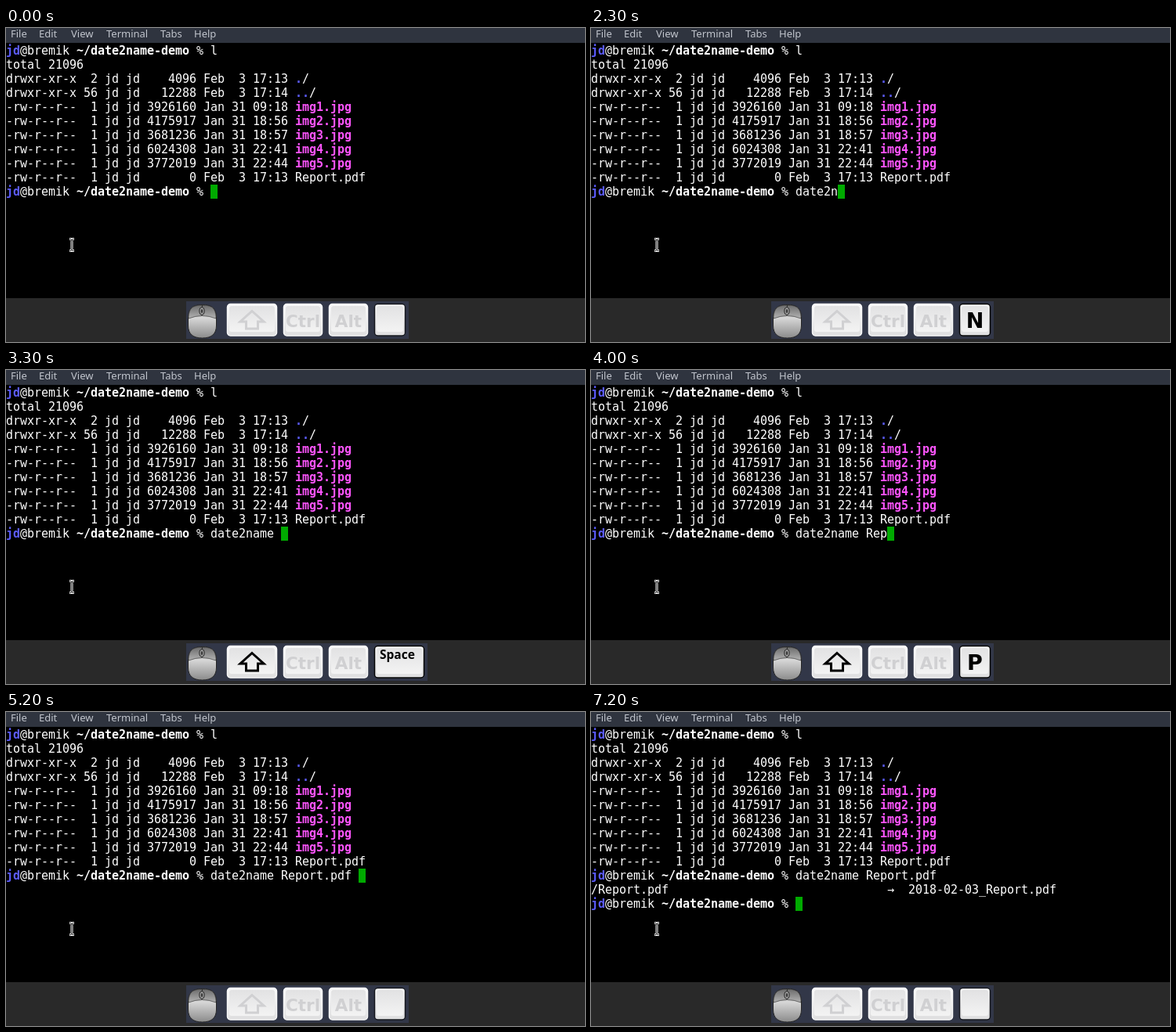
An HTML page that plays this animation: 739x401 px, repeating every 8 s.

```html
<!DOCTYPE html>
<html lang="en">
<head>
<meta charset="utf-8">
<title>Terminal demo</title>
<style>
html, body { margin: 0; width: 100%; height: 100%; overflow: hidden; background: #000; }
svg { display: block; width: 739px; height: 401px; }
text { white-space: pre; }
.term { font: 15px "DejaVu Sans Mono", monospace; letter-spacing: -.03px; fill: #fff; }
.term .b { font-weight: bold; }
.user { fill: #5c5cff; }
.img { fill: #ff55ff; }
.menu { font: 13px "Noto Sans", sans-serif; fill: #c0c4cc; }
.mod { font: bold 21.5px "DejaVu Sans", sans-serif; fill: #d0d0d2; text-anchor: middle; }
.key { font: bold 27px "DejaVu Sans", sans-serif; text-anchor: middle; }
.name { font: bold 15.5px "Noto Sans", sans-serif; }
.sign { font: 18px "DejaVu Sans", sans-serif; }
</style>
</head>
<body>
<svg id="stage" viewBox="0 0 739 401">
  <defs>
    <linearGradient id="cap" x2="0" y2="1">
      <stop offset="0" stop-color="#fbfbfb"/><stop offset="1" stop-color="#dededf"/>
    </linearGradient>
    <linearGradient id="face" x2="0" y2="1">
      <stop offset="0" stop-color="#e2e2e3"/><stop offset="1" stop-color="#f3f3f3"/>
    </linearGradient>
    <linearGradient id="body" x2="0" y2="1">
      <stop offset="0" stop-color="#b9b9b9"/><stop offset=".4" stop-color="#d6d6d6"/>
      <stop offset="1" stop-color="#8b8b8b"/>
    </linearGradient>
    <linearGradient id="buttons" x2="0" y2="1">
      <stop offset="0" stop-color="#6c6c6c"/><stop offset="1" stop-color="#b4b4b4"/>
    </linearGradient>
  </defs>
  <rect width="739" height="401"/>
  <rect width="739" height="19" fill="#2f343f"/>
  <g class="menu" id="menu"></g>
  <g class="term" id="listing"></g>
  <rect id="caret" width="9" height="18" fill="#00aa00"/>
  <g class="term" id="live"></g>
  <g fill="none">
    <path d="M81 269.500H83L84 270.500L85 269.500H87M84 270V284M81 284.500H83L84 283.500L85 284.500H87" stroke="#fff" stroke-width="3"/>
    <path d="M81.500 269.500H83L84 270.500L85 269.500H86.500M84 270V284M81.500 284.500H83L84 283.500L85 284.500H86.500" stroke="#000"/>
  </g>
  <rect y="345" width="739" height="56" fill="#292929"/>
  <rect id="panel" x="230" y="349" height="48" fill="#323748"/>
  <g stroke="#252525">
    <path d="M232.500 371C232.500 357 239 353.500 250.500 353.500S268.500 357 268.500 371V380C268.500 391 262 396 250.500 396S232.500 391 232.500 380Z" fill="url(#body)"/>
    <path d="M233 371C233 357 239 354 250.500 354S268 357 268 371Q250.500 364 233 371Z" fill="url(#buttons)" stroke-width=".6"/>
    <path d="M250.500 354V367" stroke-width=".8"/>
    <ellipse cx="250" cy="361.500" rx="3.200" ry="5" fill="#969696"/>
    <ellipse cx="250" cy="361.500" rx="1.200" ry="2.500" fill="#3a3a3a" stroke="none"/>
  </g>
  <g id="mods"></g>
  <path id="arrow" d="M314 361.500L329 375H321.500V384H306.500V375H299Z" fill="none" stroke-width="3"/>
  <g id="pressed"></g>
</svg>
<script>
const LOOP = 8000, COL = 9, ROW = 18, TOP = 20;
const $ = id => document.getElementById(id);

// [time, command, key label, shift held]
const steps = [
  [0, '', '', 0],
  [800, 'd', 'D', 0],
  [900, 'da', 'A', 0],
  [1200, 'dat', 'T', 0],
  [1300, 'date', 'E', 0],
  [2100, 'date2', 'E', 0],
  [2200, 'date2', '2', 0],
  [2300, 'date2n', 'N', 0],
  [2500, 'date2na', 'A', 0],
  [2800, 'date2nam', 'A', 0],
  [2900, 'date2nam', 'M', 0],
  [3000, 'date2name', 'M', 0],
  [3100, 'date2name', 'E', 0],
  [3200, 'date2name ', 'Space', 0],
  [3300, 'date2name ', 'Space', 1],
  [3500, 'date2name R', 'R', 1],
  [3700, 'date2name Re', 'R', 1],
  [3800, 'date2name Re', 'E', 1],
  [4000, 'date2name Rep', 'P', 1],
  [4400, 'date2name Report.pdf ', 'Tab', 1],
  [5200, 'date2name Report.pdf ', '', 0],
  [6300, 'date2name Report.pdf ', 'Enter', 0],
  [6400, 'date2name Report.pdf ', 'Enter', 0],
  [7200, 'date2name Report.pdf ', '', 0]
];
const RUN = 6400;
const signs = { Space: '', Tab: '↹', Enter: '⏎' };

const at = (col, row, s, cls = '') =>
  `<text class="${cls}" x="${col * COL}" y="${TOP + row * ROW + 14}">${s}</text>`;

const prompt = (row, cmd) =>
  at(0, row, 'jd', 'b user') + at(2, row, '@bremik') +
  at(10, row, '~/date2name-demo', 'b') + at(27, row, '% ' + cmd);

function entry(row, mode, links, size, date, name) {
  const info = `${mode} ${links.padStart(2)} jd jd ${size.padStart(7)} ${date} `;
  const dots = name.match(/^\.+/);
  if (dots) {
    const n = dots[0].length;
    return at(0, row, info) + at(41, row, dots[0], 'b user') + at(41 + n, row, '/');
  }
  return at(0, row, info) + at(41, row, name, name.endsWith('jpg') ? 'b img' : '');
}

function keycap(x, w, edge) {
  return `<rect x="${x + .5}" y="352.500" width="${w - 1}" height="40.500" rx="4" fill="url(#cap)" stroke="${edge}" stroke-width="1.500"/>` +
    `<rect x="${x + 3}" y="355" width="${w - 6}" height="33" rx="3" fill="url(#face)"/>`;
}

function build() {
  $('menu').innerHTML = [['File', 6], ['Edit', 42], ['View', 83], ['Terminal', 128], ['Tabs', 197], ['Help', 240]]
    .map(([s, x]) => `<text x="${x}" y="12">${s}</text>`).join('');

  const dir = 'drwxr-xr-x', file = '-rw-r--r--';
  const files = [
    [dir, '2', '4096', 'Feb  3 17:13', './'],
    [dir, '56', '12288', 'Feb  3 17:14', '../'],
    [file, '1', '3926160', 'Jan 31 09:18', 'img1.jpg'],
    [file, '1', '4175917', 'Jan 31 18:56', 'img2.jpg'],
    [file, '1', '3681236', 'Jan 31 18:57', 'img3.jpg'],
    [file, '1', '6024308', 'Jan 31 22:41', 'img4.jpg'],
    [file, '1', '3772019', 'Jan 31 22:44', 'img5.jpg'],
    [file, '1', '0', 'Feb  3 17:13', 'Report.pdf']
  ];
  $('listing').innerHTML = prompt(0, 'l') + at(0, 1, 'total 21096') +
    files.map((f, i) => entry(i + 2, ...f)).join('');

  $('mods').innerHTML = keycap(282, 64, '#f8f8f8') + keycap(354, 50, '#f8f8f8') + keycap(412, 50, '#f8f8f8') +
    '<text class="mod" x="379" y="382">Ctrl</text><text class="mod" x="437" y="382">Alt</text>';
}

function pressedKey(label) {
  const wide = label.length > 1;
  const cap = keycap(470, wide ? 64 : 40, label ? '#050505' : '#15171d');
  if (!wide) return cap + `<text class="key" x="490" y="383">${label}</text>`;
  return cap + `<text class="name" x="477" y="369">${label}</text>` +
    `<text class="sign" x="477" y="386">${signs[label]}</text>`;
}

let shown;
function draw(t) {
  const step = steps.findLast(s => s[0] <= t);
  if (step === shown) return;
  shown = step;
  const [time, cmd, label, shift] = step;
  const done = time >= RUN;
  $('live').innerHTML = prompt(10, cmd) + (done
    ? at(0, 11, '/Report.pdf') + at(42, 11, '→') + at(45, 11, '2018-02-03_Report.pdf') + prompt(12, '')
    : '');
  $('caret').setAttribute('x', (29 + (done ? 0 : cmd.length)) * COL);
  $('caret').setAttribute('y', TOP + (done ? 12 : 10) * ROW);
  $('panel').setAttribute('width', label.length > 1 ? 308 : 284);
  $('arrow').setAttribute('stroke', shift ? '#000' : '#d0d0d2');
  $('pressed').innerHTML = pressedKey(label);
}

function tick() {
  draw(performance.now() % LOOP);
  requestAnimationFrame(tick);
}

build();
tick();
</script>
</body>
</html>
```
